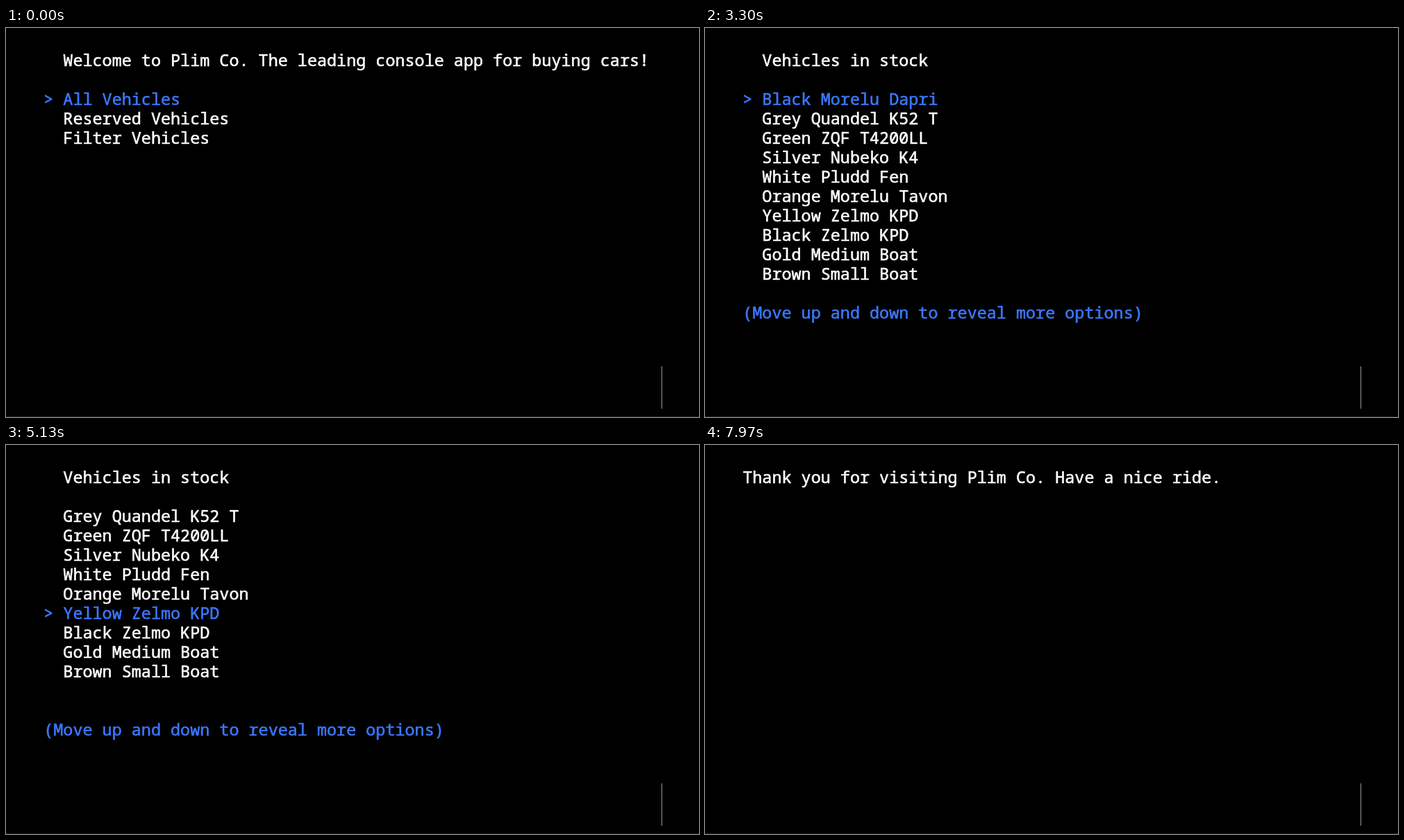
These frames come from a looping animation (998x561 px, 8 s). An HTML page:

```html
<!DOCTYPE html>
<html lang="en">
<head>
<meta charset="utf-8">
<title>Console shop</title>
<style>
  html, body { margin: 0; width: 100%; height: 100%; overflow: hidden; background: #000; }
  svg { display: block; width: 998px; height: 561px; }
  text {
    font: 400 23.44px "Noto Sans Mono", "DejaVu Sans Mono", monospace;
    fill: #fff; stroke: #fff; stroke-width: 0.6px; stroke-linejoin: round;
  }
  .active { fill: #3b78ff; stroke: #3b78ff; }
</style>
</head>
<body>
<svg viewBox="0 0 998 561">
  <g id="screen"></g>
  <rect x="944" y="488" width="1" height="61" fill="#9a988f"/>
  <rect y="560" width="998" height="1" fill="#1c1c1c"/>
</svg>
<script>
const LOOP = 8000, LEFT = 54.2, COL = 14.064, BASE = 55, ROW = 28, PAGE = 10;
const GROUP = 10; // blank heading above the indented choices

const menu = ["All Vehicles", "Reserved Vehicles", "Filter Vehicles"];
const stock = [
  "Black Morelu Dapri", "Grey Quandel K52 T", "Green ZQF T4200LL",
  "Silver Nubeko K4", "White Pludd Fen", "Orange Morelu Tavon",
  "Yellow Zelmo KPD", "Black Zelmo KPD", "Gold Medium Boat",
  "Brown Small Boat", "", "Filter Vehicles", "Main Menu"
];

const screen = document.getElementById("screen");

function put(text, col, row, active = false) {
  const node = document.createElementNS("http://www.w3.org/2000/svg", "text");
  node.setAttribute("x", LEFT + col * COL);
  node.setAttribute("y", BASE + row * ROW);
  if (active) node.setAttribute("class", "active");
  node.textContent = text;
  screen.append(node);
}

function option(text, col, row, active) {
  if (active) put(">", col - 2, row, true);
  put(text, col, row, active);
}

const views = {
  menu(selected) {
    put("Welcome to Plim Co. The leading console app for buying cars!", 2, 0);
    menu.forEach((text, i) => option(text, 2, i + 2, i === selected));
  },
  stock(selected) {
    const skip = Math.min(stock.length - PAGE, Math.max(0, selected - PAGE / 2));
    put("Vehicles in stock", 2, 0);
    stock.slice(skip, skip + PAGE).forEach((text, row) => {
      const i = row + skip;
      if (text) option(text, i > GROUP ? 4 : 2, row + 2, i === selected);
    });
    put("(Move up and down to reveal more options)", 0, 13, true);
  },
  goodbye() {
    put("Thank you for visiting Plim Co. Have a nice ride.", 0, 0);
  }
};

// Each step: start time, view, selected index
const steps = [[0, "menu", 0], [2640, "menu", 1], [2960, "menu", 0], [3200, "stock", 0]];

function press(start, gap, targets) {
  targets.forEach((target, i) => steps.push([start + i * gap, "stock", target]));
}
press(3650, 120, [1, 2, 3]);
press(3980, 82, [4, 5, 6, 7, 8, 9, 11]);
press(4620, 0, [12]);
press(4750, 88, [11, 9, 8, 7, 6, 5, 4, 3, 2, 1]);
press(5660, 0, [0]);
steps.push([6250, "goodbye", 0]);

let shown = null;
function render(now) {
  const time = (now - begin) % LOOP;
  const step = steps.findLast(([start]) => start <= time) || steps[0];
  if (step !== shown) {
    shown = step;
    screen.replaceChildren();
    views[step[1]](step[2]);
  }
}

const begin = performance.now();
function tick() {
  render(performance.now());
  requestAnimationFrame(tick);
}
tick();
</script>
</body>
</html>
```
